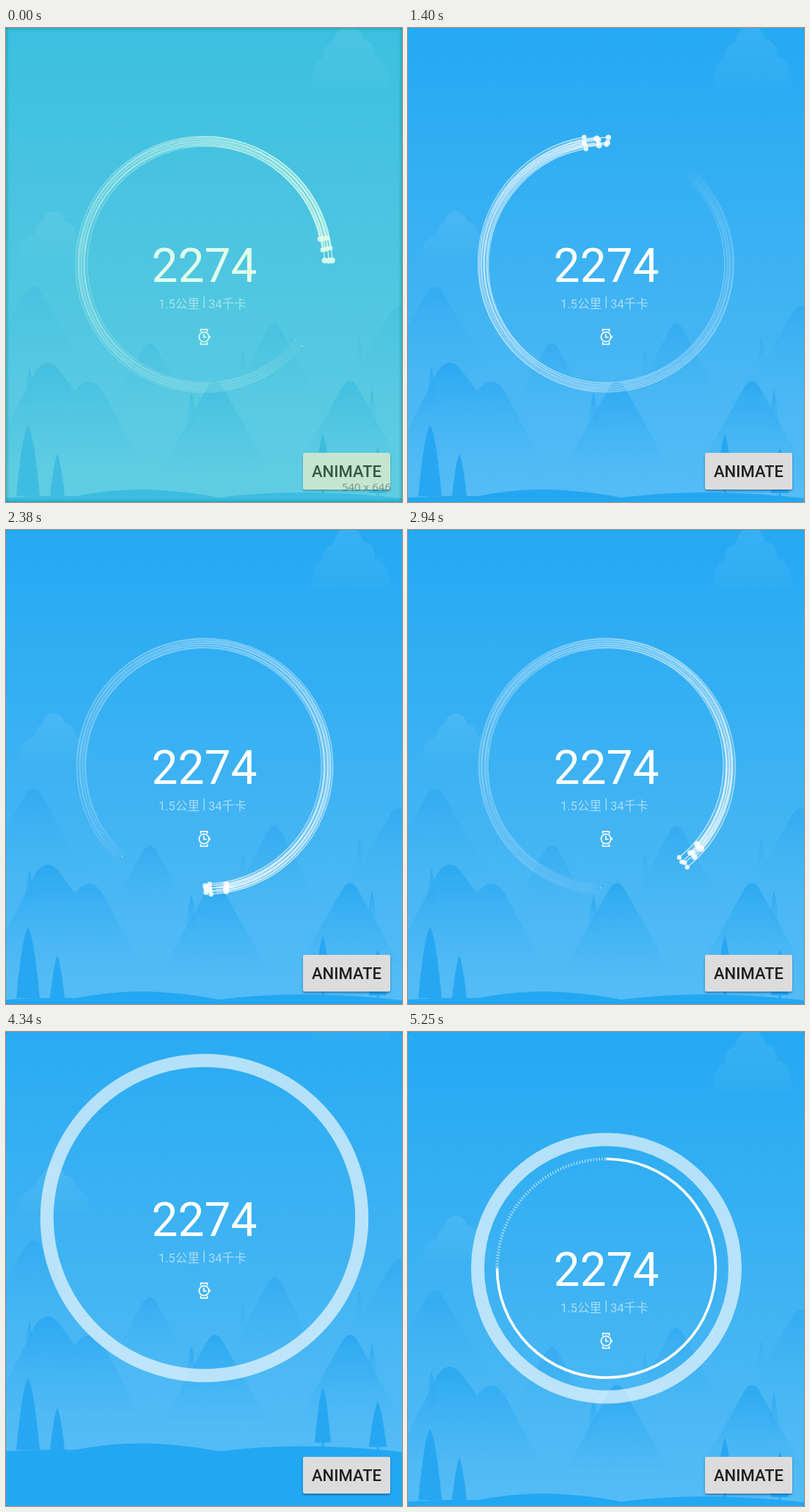
An HTML page with a canvas for the animation above (5.32 s loop, 540x646 px).

```html
<!DOCTYPE html>
<html lang="zh">
<head>
<meta charset="utf-8">
<title>Step counter</title>
<style>
  html, body { margin: 0; width: 100%; height: 100%; overflow: hidden; background: #1d6f9f; }
  #stage { position: relative; width: 540px; height: 646px; overflow: hidden; border-radius: 3px; }
  #stage > * { position: absolute; left: 0; top: 0; }
  text { font-family: Roboto, "Noto Sans CJK SC", "Noto Sans CJK", sans-serif; }
  #stage > #button {
    left: 405px; top: 579px; width: 119px; height: 50px; border-radius: 2px;
    background: #dcdcdc; color: #1f1f1f; text-align: center;
    font: 500 22px/52px Roboto, sans-serif;
    box-shadow: 0 2px 3px rgba(0, 40, 80, .4);
  }
  #tint {
    width: 540px; height: 646px; background: rgba(130, 255, 170, .25);
    box-shadow: inset 0 0 4px 1px rgba(0, 140, 130, .6);
  }
  #tint span {
    position: absolute; right: 15px; top: 615px; white-space: nowrap;
    font: 15px/20px "Open Sans", sans-serif; color: rgba(70, 95, 90, .6);
  }
</style>
</head>
<body>
<div id="stage">
  <svg width="540" height="646" viewBox="0 0 540 646">
    <defs>
      <linearGradient id="sky" x2="0" y2="1">
        <stop stop-color="#24a9f3"/>
        <stop offset=".5" stop-color="#3fb3f3"/>
        <stop offset="1" stop-color="#5abef6"/>
      </linearGradient>
      <linearGradient id="far" x2="0" y2="1">
        <stop stop-color="#2ea8ef" stop-opacity=".65"/>
        <stop offset="1" stop-color="#3cb0f2" stop-opacity="0"/>
      </linearGradient>
      <linearGradient id="near" x2="0" y2="1">
        <stop stop-color="#28a7f1" stop-opacity=".88"/>
        <stop offset="1" stop-color="#3fb2f4" stop-opacity=".12"/>
      </linearGradient>
      <linearGradient id="cloud" x2="0" y2="1">
        <stop stop-color="#fff" stop-opacity=".09"/>
        <stop offset="1" stop-color="#fff" stop-opacity=".02"/>
      </linearGradient>
    </defs>
    <rect width="540" height="646" fill="#24a9f3"/>
    <g id="scene">
      <rect width="540" height="720" fill="url(#sky)"/>
      <g fill="url(#cloud)">
        <path d="M20 312Q18 286 39 282Q42 266 50 264Q54 250 65 250Q77 250 80 264Q92 264 95 282Q114 288 113 312Z"/>
        <path d="M417 80Q415 46 432 42Q430 24 446 20Q450 -2 467 -2Q484 -2 487 16Q504 18 503 38Q524 44 523 80Z"/>
      </g>
      <g id="hills"></g>
      <g id="trees" fill="#27a7f1"></g>
      <path fill="#22a7f3" d="M0 640Q50 637 95 638Q140 629 187 629Q240 630 290 640Q350 633 400 633Q470 633 540 641V760H0Z"/>
      <circle id="ring" cx="270.5" cy="322" r="175.5" fill="none" stroke="#fff" stroke-opacity=".64" stroke-width="18"/>
      <g id="dial" fill="none" stroke="#fff" transform="rotate(-90 270.5 322)">
        <circle id="ticks" cx="270.5" cy="322" r="149" stroke-width="4" stroke-opacity=".55"/>
        <circle id="arc" cx="270.5" cy="322" r="149" stroke-width="3.6"/>
      </g>
      <text x="270.5" y="346" font-size="64" fill="#fff" text-anchor="middle">2274</text>
      <g fill="#fff" fill-opacity=".56" font-size="16.5">
        <text x="208" y="382">1.5公里</text>
        <text x="276" y="382">34千卡</text>
        <rect x="269.5" y="366" width="1.4" height="16"/>
      </g>
      <g fill="none" stroke="#fff" stroke-width="1.7">
        <circle cx="270" cy="421" r="6.7"/>
        <path d="M269.7 417V421.5H273.5M265.5 414V410.8H274.5V414M265.5 428V431H274.5V428M278 419.5V422.5"/>
      </g>
    </g>
  </svg>
  <canvas id="strands" width="540" height="646"></canvas>
  <div id="button">ANIMATE</div>
  <div id="tint"><span>540 x 646</span></div>
</div>
<script>
const LOOP = 5320, STEP = 70, CX = 270.5, CY = 322;
const $ = id => document.getElementById(id);
const rad = deg => deg * Math.PI / 180;
const clamp = v => Math.min(1, Math.max(0, v));
const ramp = (t, a, b) => clamp((t - a) / (b - a));

function addPath(parent, d, fill) {
  const p = document.createElementNS("http://www.w3.org/2000/svg", "path");
  p.setAttribute("d", d);
  if (fill) p.setAttribute("fill", fill);
  parent.append(p);
}

// Straight slopes meeting in a rounded summit
function peak(x, y, w, base, fill) {
  const tip = y - 10, k = 20 / (base - tip);
  addPath($("hills"), `M${x - w} ${base}L${x - w * k} ${tip + 20}Q${x} ${tip} ${x + w * k} ${tip + 20}L${x + w} ${base}Z`, `url(#${fill})`);
}

function spire(x, y, w, base, parent, fill) {
  addPath(parent, `M${x - w} ${base}Q${x - w * .5} ${y + 12} ${x} ${y}Q${x + w * .5} ${y + 12} ${x + w} ${base}Z`, fill);
}

[[37, 352, 74, 470], [196, 430, 50, 512], [366, 403, 62, 512], [535, 379, 70, 490]]
  .forEach(h => peak(...h, "far"));
[[323, 438, 5, 476], [482, 420, 6, 466]].forEach(s => spire(...s, $("hills"), "url(#far)"));
[[32, 462, 7, 520], [253, 497, 8, 548], [499, 492, 7, 548]].forEach(s => spire(...s, $("hills"), "url(#near)"));
// The left pair of summits shares one outline
addPath($("hills"), "M-14 575L40 468Q57 444 74 468L94 495Q115 468 133 497L180 586H-14Z", "url(#near)");
[[285, 481, 70, 596], [469, 481, 69, 594]].forEach(h => peak(...h, "near"));
[[30, 541, 16, 638], [70, 580, 10, 638], [432, 553, 11, 628], [507, 572, 12, 634]].forEach(([x, y, w, base]) => {
  spire(x, y, w, base, $("trees"));
  addPath($("trees"), `M${x - 1.5} ${base - 2}h3v14h-3Z`);
});

const HEAD = [[0, 0], [910, 373], [1890, 892], [2940, 1493], [3780, 1973]];
function headAngle(t) {
  let i = 0;
  while (i < HEAD.length - 2 && t > HEAD[i + 1][0]) i++;
  const [t0, a0] = HEAD[i], [t1, a1] = HEAD[i + 1];
  return a0 + (a1 - a0) * (t - t0) / (t1 - t0);
}

const ctx = $("strands").getContext("2d");
function drawStrands(t) {
  ctx.clearRect(0, 0, 540, 646);
  const alpha = 1 - ramp(t, 3420, 3710);
  if (!alpha) return;
  const head = headAngle(t), sweep = 320, tail = rad(head - sweep);
  const fade = ctx.createConicGradient(tail, CX, CY);
  [[0, .04], [.06, .13], [.45, .36], [.7, .62], [.88, .95], [1, .95]]
    .forEach(([at, a]) => fade.addColorStop(at, `rgba(255,255,255,${a})`));
  ctx.strokeStyle = fade;
  ctx.fillStyle = "#fff";

  ctx.globalAlpha = alpha * .28;
  ctx.lineWidth = 14;
  ctx.beginPath();
  ctx.arc(CX, CY, 168, tail, rad(head - 8));
  ctx.stroke();

  ctx.globalAlpha = alpha * .85;
  ctx.lineWidth = 1.3;
  for (let i = 0; i < 10; i++) {
    const phase = i * 2.4 + t / 900;
    const x = CX + 1.4 * Math.cos(phase), y = CY + 1.4 * Math.sin(phase * 1.3);
    const r = 161 + i * 1.5;
    const end = rad(head - 7 - 6 * Math.sin(i * 2.1 + t / 700));
    ctx.beginPath();
    ctx.arc(x, y, r, tail + rad(i % 4), end);
    ctx.stroke();
    ctx.beginPath();
    ctx.arc(x + r * Math.cos(end), y + r * Math.sin(end), 3.2 + i % 3 * .5, 0, 7);
    ctx.fill();
  }
}

const ARC = 2 * Math.PI * 149, GOAL = ARC * .75;
const dash = ["1.6 2.3"];
const tickRun = Math.floor(ARC * .25 / 3.9);
// Ticks fill only the last quarter
$("ticks").setAttribute("stroke-dasharray", `0 ${GOAL + 1} ` + `${dash[0]} `.repeat(tickRun) + "0 9");

function draw(t) {
  const lift = t > 3700 && t < 5000 ? (1 - Math.cos((t - 3700) / 650 * Math.PI)) / 2 : 0;
  $("scene").setAttribute("transform", `translate(0 ${-68.5 * lift})`);
  $("ring").setAttribute("r", 175.5 + 39.25 * lift);
  $("ring").setAttribute("opacity", ramp(t, 3800, 4010));

  const sweep = 1 - (1 - ramp(t, 4620, 5250)) ** 2;
  $("dial").setAttribute("opacity", ramp(t, 4600, 4900));
  $("arc").setAttribute("stroke-dasharray", `${GOAL * sweep} ${ARC}`);

  drawStrands(t);
  $("button").style.background = t > 700 && t < 1120 ? "#d5d5d5" : "#dcdcdc";
  $("tint").style.opacity = 1 - ramp(t, 0, 350);
}

const start = performance.now();
function tick() {
  const t = (performance.now() - start) % LOOP;
  draw(Math.floor(t / STEP) * STEP);
  requestAnimationFrame(tick);
}
tick();
</script>
</body>
</html>
```
